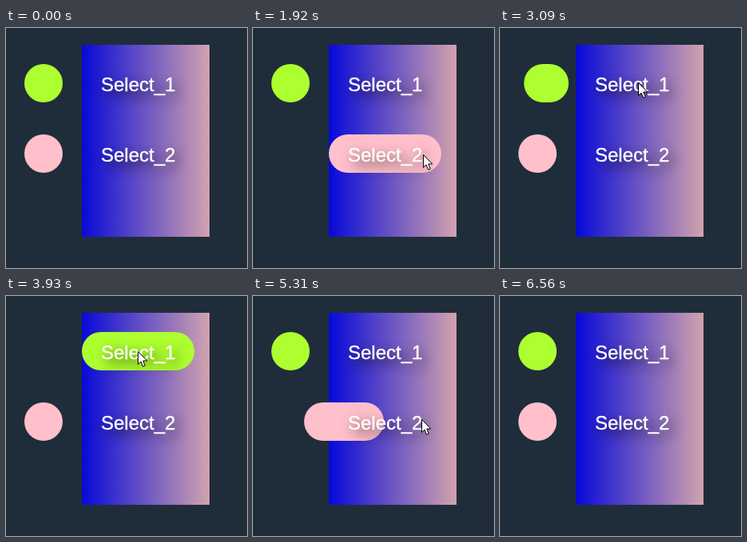
These frames come from a looping animation (302x300 px, 7.7 s). An HTML page:

```html
<!DOCTYPE html>
<html lang="en">
<head>
<meta charset="utf-8">
<title>Menu hover</title>
<style>
  html, body { margin: 0; width: 100%; height: 100%; overflow: hidden; background: #1f2d3b; }
  body > * { position: absolute; }
  #panel { left: 95px; top: 21px; width: 160px; height: 240px; opacity: .8;
    background: linear-gradient(to right, blue, pink); }
  .pill { height: 48px; border-radius: 24px; }
  #green { top: 45px; background: greenyellow; }
  #pink { top: 133px; background: pink; }
  .label { left: 119px; font: 24px/48px "Liberation Sans", Arial, sans-serif; color: #fff;
    -webkit-text-stroke: .4px #fff; text-shadow: 5px 6px 15px rgba(0, 0, 0, .8); }
  #cursor { left: 0; top: 0; overflow: visible; }
</style>
</head>
<body>
<div id="panel"></div>
<div id="green" class="pill"></div>
<div id="pink" class="pill"></div>
<div class="label" style="top:47px">Select_1</div>
<div class="label" style="top:135px">Select_2</div>
<svg id="cursor" width="13" height="21">
  <path d="M.5 .5V16.5L4 13L6.6 19.2L9.3 18.1L6.7 12H11.8Z" fill="#fff" stroke="#000"/>
</svg>
<script>
const LOOP = 7700, GROW = 1000, SHRINK = 500;
const $ = id => document.getElementById(id);

// Hover enter and leave times
const hovers = {
  green: [[2993, 4345]],
  pink: [[775, 2120], [4985, 6050]]
};

// Pointer stops: time, x, y
const stops = [
  [330, 285, 288], [1160, 211, 157], [1920, 213, 158], [2620, 190, 90], [3090, 173, 68],
  [3930, 165, 69], [4550, 168, 96], [5310, 211, 154], [5900, 213, 156], [6560, 304, 184]
];

const mix = (a, b, u) => a + (b - a) * u;

// CSS "ease": cubic-bezier(.25, .1, .25, 1)
function ease(x) {
  if (x <= 0) return 0;
  if (x >= 1) return 1;
  const bez = (a, b, u) => 3 * a * u * (1 - u) ** 2 + 3 * b * u * u * (1 - u) + u ** 3;
  let lo = 0, hi = 1;
  for (let i = 0; i < 24; i++) {
    const mid = (lo + hi) / 2;
    if (bez(.25, .25, mid) < x) lo = mid; else hi = mid;
  }
  return bez(.1, 1, lo);
}

function openness(spans, t) {
  let p = 0;
  for (const [enter, leave] of spans)
    if (t >= enter) p = t < leave ? ease((t - enter) / GROW) : 1 - ease((t - leave) / SHRINK);
  return p;
}

function pointer(t) {
  const i = stops.findIndex(s => s[0] > t);
  if (i < 1) return null;
  const [t0, x0, y0] = stops[i - 1], [t1, x1, y1] = stops[i];
  const u = (t - t0) / (t1 - t0);
  return [mix(x0, x1, u), mix(y0, y1, u)];
}

function draw(t) {
  for (const id in hovers) {
    const p = openness(hovers[id], t), s = $(id).style;
    s.left = mix(23, 95, p) + "px";
    s.width = mix(48, 141.4, p) + "px";
  }
  const pos = pointer(t), c = $("cursor").style;
  c.display = pos ? "block" : "none";
  if (pos) c.transform = `translate(${pos.map(v => Math.round(v) + "px")})`;
}

const begin = performance.now();
function tick() {
  draw((performance.now() - begin) % LOOP);
  requestAnimationFrame(tick);
}
tick();
</script>
</body>
</html>
```
